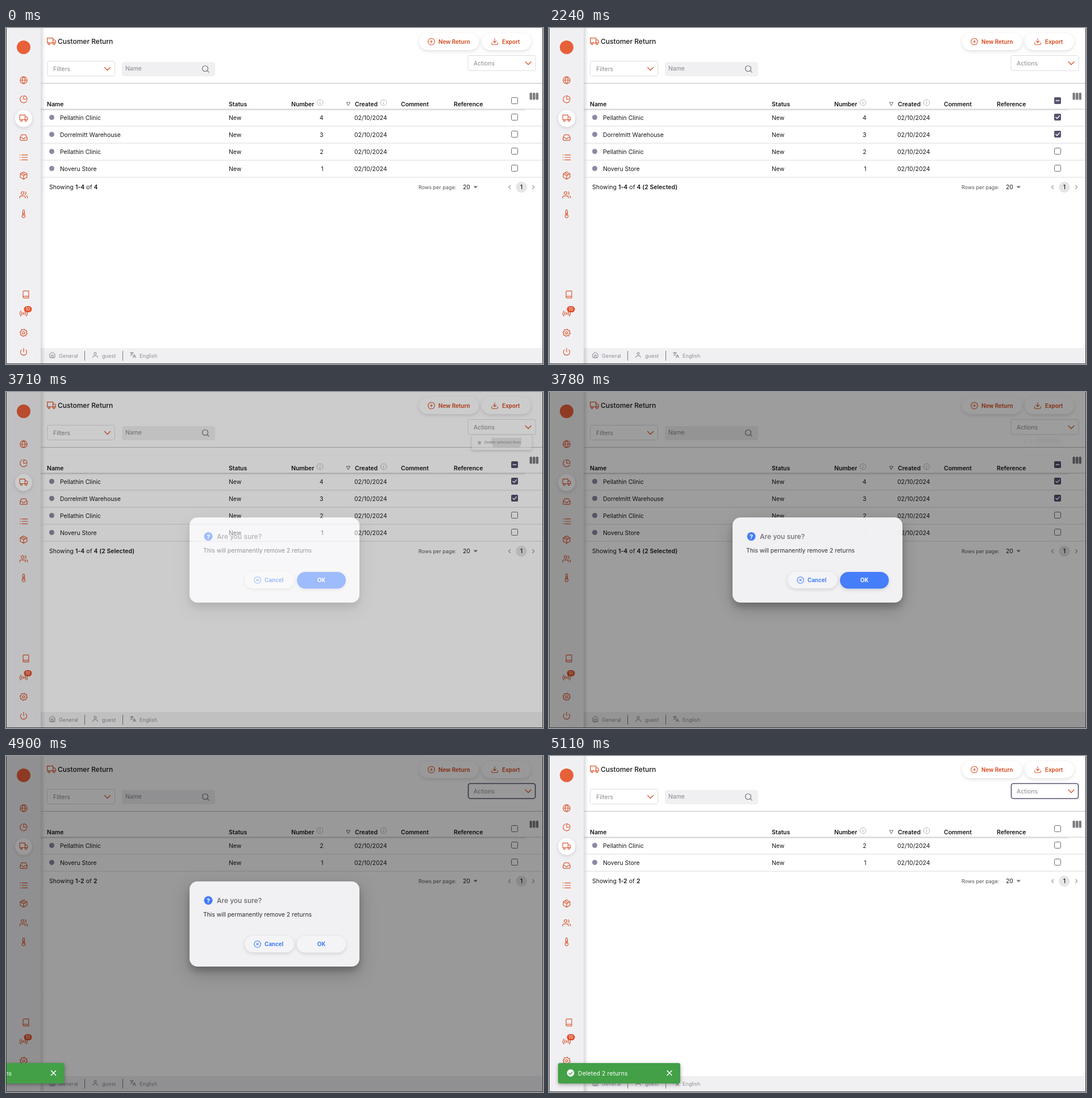
An HTML page that plays this animation: 945x592 px, repeating every 5.74 s.

```html
<!DOCTYPE html>
<html lang="en">
<head>
<meta charset="utf-8">
<title>Customer returns</title>
<style>
  html, body { margin: 0; width: 100%; height: 100%; overflow: hidden; background: #fff; }
  svg { display: block; width: 945px; height: 592px; font: 10.4px Inter, sans-serif; }
  text { white-space: pre; }
  .b { font-weight: 600; }
  .btn { font-size: 9.75px; font-weight: 700; }
  .foot { font-size: 9px; fill: #8d8b96; letter-spacing: .1px; }
  .soft { filter: drop-shadow(0 2px 3px rgba(0,0,0,.13)); }
  .pop { filter: drop-shadow(0 2px 3px rgba(0,0,0,.35)); }
  .deep { filter: drop-shadow(0 8px 6px rgba(0,0,0,.2)) drop-shadow(0 10px 16px rgba(0,0,0,.2)); }
</style>
</head>
<body>
<svg viewBox="0 0 945 592">
  <defs>
    <linearGradient id="edge"><stop stop-opacity=".14"/><stop offset="1" stop-opacity="0"/></linearGradient>
    <linearGradient id="under" x2="0" y2="1"><stop stop-opacity=".1"/><stop offset="1" stop-opacity="0"/></linearGradient>
    <clipPath id="item"><rect x="813" y="82" width="119" height="21"/></clipPath>
  </defs>
  <g id="page"></g>
  <g id="table"></g>
  <g id="over"></g>
  <path d="M.5 0V591.5H944.5V0" fill="none" stroke="#39393c"/>
</svg>
<script>
const LOOP = 5740, STEP = 70;
const ORANGE = '#d9572f', BLUE = '#3f7af8', DARK = '#55516f';
const $ = id => document.getElementById(id);
const clamp = v => Math.min(1, Math.max(0, v));
const ramp = (t, a, b) => clamp((t - a) / (b - a));
const smooth = p => p * p * (3 - 2 * p);

const rect = (x, y, w, h, fill, more = '') =>
  `<rect x="${x}" y="${y}" width="${w}" height="${h}" fill="${fill}" ${more}/>`;
const circle = (x, y, r, fill, more = '') => `<circle cx="${x}" cy="${y}" r="${r}" fill="${fill}" ${more}/>`;
const text = (x, y, s, more = '', fill = '#17171b') => `<text x="${x}" y="${y}" fill="${fill}" ${more}>${s}</text>`;
const line = (d, color, w = 1) =>
  `<path d="${d}" fill="none" stroke="${color}" stroke-width="${w}" stroke-linecap="round" stroke-linejoin="round"/>`;
const ring = (x, y, r) => `M${x - r} ${y}a${r} ${r} 0 1 0 ${2 * r} 0a${r} ${r} 0 1 0 ${-2 * r} 0`;
// Icons are drawn on a 24 unit grid and centred on (x, y)
const icon = (x, y, d, color = ORANGE, s = .62, w = 1.9) =>
  `<g transform="translate(${x} ${y}) scale(${s}) translate(-12 -12)">${line(d, color, w)}</g>`;

const gear = 'M' + Array.from({ length: 32 }, (_, i) => {
  const a = (i + .5) * Math.PI / 16, r = i % 4 < 2 ? 10.5 : 8;
  return `${(12 + r * Math.cos(a)).toFixed(1)} ${(12 + r * Math.sin(a)).toFixed(1)}`;
}).join('L') + 'z' + ring(12, 12, 3.2);

const ICON = {
  globe: ring(12, 12, 10) + 'M2 12h20M12 2c6 6 6 14 0 20c-6-6-6-14 0-20',
  pie: 'M21.2 15.9A10 10 0 1 1 8 2.8M22 12A10 10 0 0 0 12 2v10z',
  truck: 'M1 3h15v13H1zM16 8h4l3 3v5h-7' + ring(5.5, 18.5, 2.5) + ring(18.5, 18.5, 2.5),
  inbox: 'M22 12h-6l-2 3h-4l-2-3H2M5.5 5.1 2 12v6a2 2 0 0 0 2 2h16a2 2 0 0 0 2-2v-6l-3.5-6.9A2 2 0 0 0 16.8 4H7.2a2 2 0 0 0-1.7 1.1z',
  list: 'M7 5h16M7 12h16M7 19h16M1.5 5h1M1.5 12h1M1.5 19h1',
  box: 'M21.5 17V7L12 1.5 2.5 7v10l9.5 5.500zM2.500 7 12 12.500l9.500-5.500M12 22.500v-10M7 4.200l9.500 5.500',
  users: 'M17 21v-2a4 4 0 0 0-4-4H5a4 4 0 0 0-4 4v2M23 21v-2a4 4 0 0 0-3-3.900M16 3.100a4 4 0 0 1 0 7.800' + ring(9, 7, 4),
  thermo: 'M14.500 14.800V3.500a2.500 2.500 0 0 0-5 0v11.300a4.500 4.500 0 1 0 5 0zM12 9v8',
  book: 'M4 19.500A2.500 2.500 0 0 1 6.500 17H20M6.500 2H20v20H6.500A2.500 2.500 0 0 1 4 19.500v-15A2.500 2.500 0 0 1 6.500 2z',
  signal: ring(12, 12, 2) + 'M16.200 7.800a6 6 0 0 1 0 8.500M7.800 16.200a6 6 0 0 1 0-8.500M19.500 4.500a10.600 10.600 0 0 1 0 15M4.500 19.500a10.600 10.600 0 0 1 0-15',
  power: 'M18.400 6.600a9 9 0 1 1-12.800 0M12 2v10',
  home: 'M3 9l9-7 9 7v11a2 2 0 0 1-2 2H5a2 2 0 0 1-2-2zM9 22V12h6v10',
  user: 'M20 21v-2a4 4 0 0 0-4-4H8a4 4 0 0 0-4 4v2' + ring(12, 7, 4),
  language: 'M2 5h12M8 2v3M11 5c-1 5-4 8-8 10M5 8c1 3 4 5 7 6M12 22l5-11 5 11M14 18h6',
  download: 'M21 15v4a2 2 0 0 1-2 2H5a2 2 0 0 1-2-2v-4M7 10l5 5 5-5M12 15V3',
  plus: ring(12, 12, 10) + 'M12 8v8M8 12h8',
  cancel: ring(12, 12, 10) + 'M9 9l6 6M15 9l-6 6',
  trash: 'M3 6h18M8 6V3h8v3M19 6l-1 15H6L5 6M10 11v6M14 11v6'
};

const chevron = (x, y) => line(`M${x - 5} ${y - 2.5}l5 5 5-5`, ORANGE, 1.4);
const pill = (x, y, w, h, fill = '#fff') => rect(x, y, w, h, fill, `rx="${h / 2}" class="soft"`);
const info = x => line(ring(x, 131.5, 5.2), '#9a9aa0', .7) + line(`M${x} 131v3M${x} 129v.1`, '#9a9aa0', .8);

function checkbox(y, mark, fill = DARK) {
  const x = 889;
  if (!mark) return rect(x + .5, y - 5.5, 11, 11, '#fff', 'rx="2" stroke="#69676f"');
  const d = mark === 'some' ? `M${x + 3.2} ${y}h5.6` : `M${x + 2.8} ${y + .2}l2.3 2.3 4.300-4.700`;
  return rect(x, y - 6, 12, 12, fill, 'rx="2"') + line(d, '#fff', 1.4);
}

function page(tint) {
  const side = [['globe', 92], ['pie', 125.5], ['truck', 159], ['inbox', 193], ['list', 228], ['box', 260],
    ['users', 294], ['thermo', 327.5], ['signal', 503], ['power', 570.5]];
  return rect(0, 0, 945, 592, '#fff')
    + (tint ? rect(61, 0, 884, 97, '#f3f3f6') : '')
    + rect(61, 564, 884, 28, '#f0f0f2')
    + rect(61, 0, 8, 592, 'url(#edge)') + rect(0, 0, 61, 592, '#f0f0f3')
    + circle(31, 34, 12, '#e8603a')
    + circle(31, 159.5, 15, '#fff', 'class="soft"')
    + side.map(([name, y]) => icon(31, y, ICON[name])).join('')
    + icon(35, 469.5, ICON.book) + icon(31, 537, gear)
    + rect(31.5, 490, 14, 11, '#e0552d', 'rx="5.5"')
    + text(38.5, 498, '10', 'text-anchor="middle" font-size="7"', '#fff')
    + icon(80, 23.5, ICON.truck, ORANGE, .66)
    + text(91, 28, 'Customer Return', 'font-size="12" font-weight="500"')
    + pill(727, 9, 105, 30) + icon(748.5, 24, ICON.plus, ORANGE, .58)
    + text(761, 27.5, 'New Return', 'class="btn"', ORANGE)
    + pill(837, 9, 87, 30) + icon(860, 24, ICON.download, ORANGE, .58)
    + text(873, 27.5, 'Export', 'class="btn"', ORANGE)
    + rect(72.5, 58.5, 119, 26, '#fff', 'rx="3" stroke="#dcdce0"')
    + text(83, 75.5, 'Filters', '', '#8a8a92') + chevron(178.5, 72)
    + rect(204, 60, 164, 25, '#f0f0f2', 'rx="4"')
    + text(210, 75, 'Name', '', '#85858d') + line(ring(350.500, 71.500, 5) + 'M354.200 75.200l3 3', '#77777f', 1.2)
    + rect(61, 97, 884, 1, '#bcbcc0')
    + icon(81.5, 576, ICON.home, '#7d7b88', .5) + text(93, 580.5, 'General', 'class="foot"')
    + icon(157, 576, ICON.user, '#7d7b88', .5) + text(169, 580.5, 'guest', 'class="foot"')
    + icon(223.5, 576, ICON.language, '#7d7b88', .5) + text(235, 580.5, 'English', 'class="foot"')
    + rect(138, 569, 1, 17, '#77777c') + rect(205, 569, 1, 17, '#77777c');
}

const ROWS = [['Pellathin Clinic', 4], ['Dorrelmitt Warehouse', 3], ['Pellathin Clinic', 2], ['Noveru Store', 1]];
const HEADS = [[72, 'Name'], [392, 'Status'], [502, 'Number'], [614, 'Created'], [695, 'Comment'], [788, 'Reference']];

function table(t, tint) {
  const deleted = t >= 4830;
  const rows = deleted ? ROWS.slice(2) : ROWS;
  const picked = deleted || t < 1330 ? 0 : t < 2100 ? 1 : 2;
  // The row just ticked flashes for a moment
  const flash = t === 1330 ? [0, 1] : t === 2100 ? [1, 1] : t === 2170 ? [1, .4] : [-1, 0];
  const n = rows.length, y0 = 143 + 30 * n;

  const body = rows.map(([name, number], i) => {
    const y = 143 + 30 * i, lit = flash[0] === i;
    return (tint && i % 2 === 0 ? rect(61, y, 853, 30, '#f3f3f6') : '')
      + (lit ? `<g opacity="${flash[1]}">${rect(61, y, 883, 30, '#e9eefb')}${rect(869, y, 45, 30, '#9fd6f3')}</g>` : '')
      + rect(61, y + 29.5, 884, 1, '#dcdcde')
      + circle(80.5, y + 14.5, 4.5, '#8c8aa3')
      + text(95, y + 18.5, name) + text(392, y + 18.5, 'New')
      + text(558.5, y + 18.5, number, 'text-anchor="end"') + text(613, y + 18.5, '02/10/2024', 'letter-spacing=".06"')
      + checkbox(y + 14, i < picked, lit && flash[1] === 1 ? '#5865a6' : DARK);
  }).join('');

  const chosen = picked ? ` (${picked} Selected)` : '';
  return body
    + HEADS.map(([x, s]) => text(x, 137.5, s, 'class="b"')).join('') + info(552.5) + info(664.5)
    + line('M599.500 131h6l-3 5.500z', '#55555c', .9)
    + checkbox(128, picked && 'some')
    + [921.5, 927, 932.5].map(x => rect(x, 114, 4.4, 12.5, '#7b7b7e', 'rx="1.5"')).join('')
    + rect(61, 142.5, 884, 1, '#c9c9cc') + rect(61, 143, 853, 4, 'url(#under)')
    + `<g transform="translate(0 ${y0})">`
    + text(76, 21, `Showing <tspan class="b">1-${n}</tspan> of <tspan class="b">${n}${chosen}</tspan>`, 'letter-spacing=".08"')
    + text(726, 21, 'Rows per page:', 'font-size="9"', '#55555c') + text(804, 21, '20')
    + '<path d="M822.500 15.500h7.500l-3.750 4z" fill="#77777a"/>'
    + circle(907, 17.5, 9.7, '#e5e5e7') + text(907, 21, '1', 'text-anchor="middle" font-weight="500"')
    + line('M887.500 14.500l-3 3 3 3M926.500 14.500l3 3-3 3', '#97979b', 1.1)
    + '</g>';
}

function actions(t) {
  const focused = t >= 4830;
  return (focused ? rect(813.500, 48.500, 118, 26.500, '#fff', `rx="4" stroke="${DARK}" stroke-width="1.6"`)
    : rect(813, 48.5, 119, 26.500, '#fff', 'rx="3" stroke="#dcdce0"'))
    + text(823, 66, 'Actions', '', '#8a8a92') + chevron(919, 62);
}

function menu(t) {
  const show = ramp(t, 2730, 3010) * (1 - ramp(t, 3640, 3790));
  if (!show) return '';
  const hide = 1 - show, wave = ramp(t, 3430, 3640);
  return `<g opacity="${show}" transform="translate(872 76) scale(${1 - .25 * hide} ${1 - .44 * hide}) translate(-872 -76)">`
    + rect(813, 76, 119, 33, '#fff', 'rx="3" class="pop"')
    + `<g clip-path="url(#item)">${circle(882, 88, 30 * wave, '#d2d2d4')}</g>`
    + icon(828, 93, ICON.trash, '#44444a', .32, 2.6)
    + text(838, 95, 'Delete selected lines', 'font-size="7.4"', '#333338') + '</g>';
}

function dialog(t, show) {
  if (!show) return '';
  const fill = 1 - ramp(t, 4550, 4830);
  const ok = color => text(555, 335, 'OK', 'class="btn" text-anchor="middle"', color);
  return `<g opacity="${show}">` + rect(0, 0, 945, 592, '#000', 'opacity=".4"')
    + rect(323, 221, 299, 150, '#f1f1f4', 'rx="14" class="deep"')
    + circle(356, 254.5, 7.5, BLUE) + text(356, 258.5, '?', 'text-anchor="middle" font-size="11" font-weight="700"', '#fff')
    + text(371, 258.5, 'Are you sure?', 'font-size="12" font-weight="500"', '#66666c')
    + text(347, 282.5, 'This will permanently remove 2 returns', '', '#2b2b30')
    + pill(420, 317, 87, 29, '#f4f4f7') + icon(442.5, 331.5, ICON.cancel, BLUE, .57)
    + text(455, 335, 'Cancel', 'class="btn"', BLUE)
    + pill(512, 317, 86, 29.5, '#f4f4f7') + ok(BLUE)
    + `<g opacity="${fill}">${rect(512, 317, 86, 29.5, BLUE, 'rx="14.75"')}${ok('#fff')}</g></g>`;
}

function toast(t) {
  const p = ramp(t, 4860, 5085);
  if (!p) return '';
  return `<g transform="translate(${-231 * (1 - p) ** 3} 0)">`
    + rect(16, 541, 215, 36, '#43a047', 'rx="3" class="pop"')
    + circle(38, 558.5, 6.4, '#fff') + line('M35 558.700l2.200 2.200 4-4.400', '#43a047', 1.4)
    + text(51, 562.5, 'Deleted 2 returns', 'letter-spacing=".15"', '#fff')
    + line('M208 554.500l8 8M216 554.500l-8 8', '#fff', 1.6) + '</g>';
}

let last = -1;
function draw(now) {
  const t = Math.floor(now % LOOP / STEP) * STEP;
  if (t !== last) {
    last = t;
    const show = smooth(ramp(t, 3620, 3800)) * (1 - smooth(ramp(t, 4900, 5095)));
    const tint = t < 4000 && show > 0 && show < .1;
    $('page').innerHTML = page(tint);
    $('table').innerHTML = table(t, tint);
    $('over').innerHTML = actions(t) + menu(t) + dialog(t, show) + toast(t);
  }
  requestAnimationFrame(draw);
}
draw(performance.now());
</script>
</body>
</html>
```
